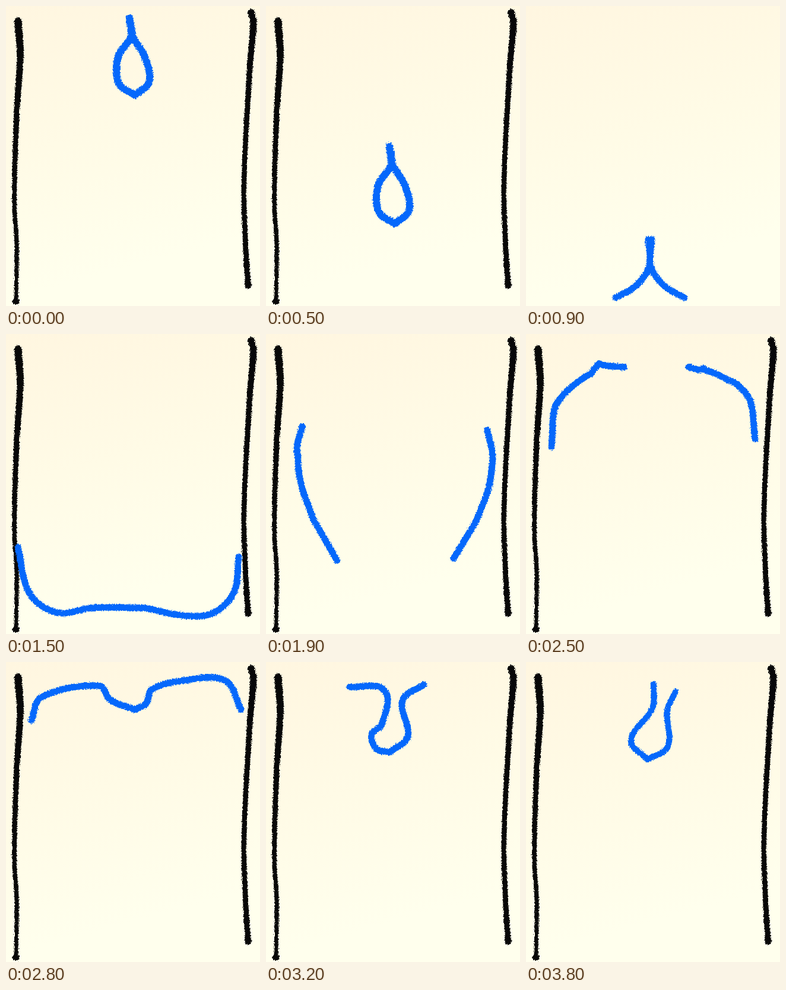
These frames come from a looping animation (428 by 505 pixels, 3.9 s). An HTML page:

```html
<!DOCTYPE html>
<html lang="en">
<head>
<meta charset="utf-8">
<title>Drop cycle</title>
<style>
  html, body { margin: 0; width: 100%; height: 100%; overflow: hidden; }
  body { background: linear-gradient(165deg, #fff6e0, #fffbe6 42%, #ffffed 80%); }
  svg { display: block; width: 428px; height: 505px; }
</style>
</head>
<body>
<svg viewBox="0 0 428 505">
  <filter id="crayon" filterUnits="userSpaceOnUse" x="0" y="0" width="428" height="505" color-interpolation-filters="sRGB">
    <feTurbulence type="fractalNoise" baseFrequency="0.5" numOctaves="2" seed="4" result="grain"/>
    <feDisplacementMap in="SourceGraphic" in2="grain" scale="6" xChannelSelector="R" yChannelSelector="G"/>
    <feGaussianBlur stdDeviation="0.5"/>
  </filter>
  <g filter="url(#crayon)">
    <g id="walls" fill="#080808"></g>
    <g id="water" fill="none" stroke="#0568fb" stroke-linecap="round" stroke-linejoin="round">
      <path/><path/>
    </g>
  </g>
</svg>
<script>
const LOOP = 3900, TICK = 100, DRAWINGS = 32, LANDING = 7, BARE = 8;
const SAMPLES = 36;
const walls = document.getElementById('walls');
const water = document.getElementById('water');

const mix = (a, b, p) => a + (b - a) * p;
const mixPoint = (a, b, p) => [mix(a[0], b[0], p), mix(a[1], b[1], p)];
const distance = (a, b) => Math.hypot(b[0] - a[0], b[1] - a[1]);
const line = pts => 'M' + pts.join('L');

// Handle at b, parallel to a-c and a third as long as the segment.
function handle(a, b, c, length) {
  const k = length / 3 / distance(a, c);
  return [b[0] + (c[0] - a[0]) * k, b[1] + (c[1] - a[1]) * k];
}

// Evenly many samples of a smooth curve through the key points.
function smooth(keys) {
  const segments = keys.length - 1;
  return Array.from({ length: SAMPLES + 1 }, (_, n) => {
    const s = n / SAMPLES * segments;
    const i = Math.min(Math.floor(s), segments - 1), p = s - i;
    const b = keys[i], c = keys[i + 1], length = distance(b, c);
    let row = [b, handle(keys[i - 1] || b, b, c, length), handle(keys[i + 2] || c, c, b, length), c];
    while (row.length > 1) row = row.slice(1).map((pt, k) => mixPoint(row[k], pt, p));
    return row[0];
  });
}

// Near-vertical ribbon with a blob at each end; widthAt takes 0 (top) to 1.
function wall(widthAt, ...keys) {
  const spine = smooth(keys);
  const edge = side => spine.map(([x, y]) => {
    const u = (y - spine[0][1]) / (spine[SAMPLES][1] - spine[0][1]);
    return [x + side * widthAt(u) / 2, y];
  });
  const blob = ([x, y]) => `<circle cx="${x}" cy="${y}" r="6"/>`;
  walls.innerHTML += `<path d="${line([...edge(-1), ...edge(1).reverse()])}Z"/>`
    + blob(spine[0]) + blob(spine[SAMPLES]);
}

wall(u => 7 + 6 * (1 - u) ** 2, [20, 25], [24, 82], [18, 180], [14, 335], [18, 400], [17, 497]);
wall(u => 8.5 + 9 * (u - 0.6) ** 2, [413, 11], [417, 28], [411, 100], [401, 300], [404, 410], [408, 470]);

// Two strands of water, each from its trailing end to its leading end.
const poses = [];
const pose = (at, width, ...strands) => poses.push({ at, width, strands: strands.map(smooth) });
const mirror = (axis, keys) => keys.map(([x, y]) => [2 * axis - x, y]);

const tail = [208, 20], belly = [217, 150];
const drop = [
  [tail, [211, 50], [189, 86], [190, 130], belly],
  [tail, [213, 50], [234, 86], [241, 128], belly],
];
const leg = [[206, 393], [208, 437], [185, 471], [151, 491]];
const puddle = [234, 461], dip = [217, 80], bulge = [208, 152], bottom = [205, 164];

pose(0, 12, ...drop);
pose(LANDING, 12, ...drop.map(keys => keys.map(([x, y]) => [x, y + 335])));
pose(8, 11, leg, mirror(209, leg));
pose(13, 11, [puddle, [145, 461], [86, 469], [40, 437], [20, 359]],
  [puddle, [300, 474], [348, 470], [384, 435], [392, 375]]);
pose(18, 11, [[43, 328], [35, 170], [55, 42], [88, 20]],
  [[371, 322], [396, 165], [385, 65], [360, 19]]);
pose(23, 11, [[43, 98], [60, 59], [157, 40], [176, 64], dip],
  [[396, 80], [369, 31], [300, 31], [246, 46], [236, 70], dip]);
pose(26, 11, [[141, 42], [200, 48], [195, 105], [178, 122], [186, 146], bulge],
  [[266, 38], [230, 65], [239, 125], bulge]);
pose(31, 10, [[215, 37], [213, 78], [177, 132], bottom],
  [[252, 50], [238, 82], [239, 142], bottom]);
pose(DRAWINGS, 12, ...drop);

// Every fifth drawing is held for two ticks.
function drawingAt(ms) {
  const tick = Math.floor((ms % LOOP) / TICK);
  return tick - Math.max(0, Math.floor((tick - 1) / 5));
}

function render(drawing) {
  const next = poses.findIndex(p => p.at > drawing);
  const a = poses[next - 1], b = poses[next];
  let p = (drawing - a.at) / (b.at - a.at);
  if (b.at === LANDING) p **= 1.3;
  a.strands.forEach((strand, i) => {
    const pts = strand.map((pt, k) => mixPoint(pt, b.strands[i][k], p));
    water.children[i].setAttribute('d', line(pts));
  });
  water.setAttribute('stroke-width', mix(a.width, b.width, p));
  walls.setAttribute('visibility', drawing === BARE ? 'hidden' : 'visible');
}

const begin = performance.now();
let shown = 0;
function frame() {
  const drawing = drawingAt(performance.now() - begin);
  if (drawing !== shown) render(shown = drawing);
  requestAnimationFrame(frame);
}
render(0);
requestAnimationFrame(frame);
</script>
</body>
</html>
```
